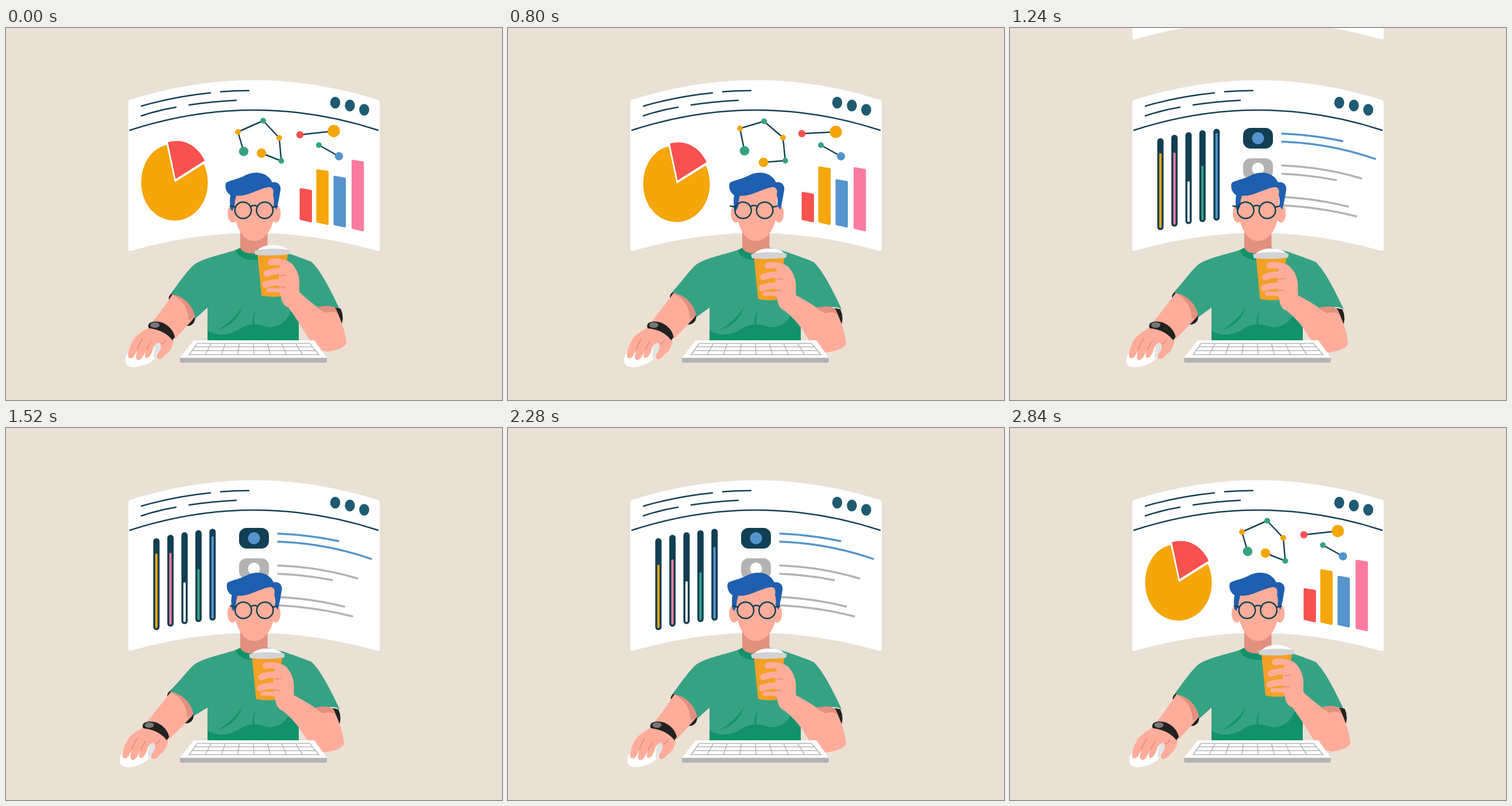
An HTML page for the animation above (2.88 s loop, 864 by 648 pixels).

```html
<!DOCTYPE html>
<html lang="en">
<head>
<meta charset="utf-8">
<title>Dashboard desk</title>
<style>
html, body { margin: 0; width: 100%; height: 100%; overflow: hidden; background: #eae0d4; }
svg { display: block; width: 100vw; height: 100vh; }
.line { fill: none; stroke: #134153; stroke-width: 2.5; stroke-linecap: round; stroke-linejoin: round; }
.skin { fill: #ffad9a; }
.shade { fill: #e2907f; }
.green { fill: #36a284; }
.deep { fill: #12926a; }
.black { fill: #222; }
.white { fill: #fff; }
.finger { fill: none; stroke: #ffad9a; stroke-width: 11; stroke-linecap: round; }
.crease { fill: none; stroke: #e2907f; stroke-width: 1.8; stroke-linecap: round; }
</style>
</head>
<body>
<svg viewBox="0 0 864 648">
  <defs>
    <g id="window">
      <path class="white" d="M213 130Q213 126 217 125Q432 57 647 125Q651 126 651 130V385Q651 389 646 388Q432 326 218 388Q213 389 213 385Z"/>
      <path class="line" d="M216 178Q432 108 648 178M236 136Q295 119 356 113M374 111Q398 109 423 109M236 153Q265 143 296 138M319 134Q360 128 401 126"/>
      <g fill="#1f5a73">
        <ellipse cx="573.5" cy="130" rx="8.7" ry="10.3"/>
        <ellipse cx="599" cy="135" rx="8.7" ry="10.3"/>
        <ellipse cx="624" cy="142.5" rx="8.7" ry="10.3"/>
      </g>
    </g>
  </defs>
  <rect width="864" height="648" fill="#eae0d4"/>

  <g id="settings">
    <use href="#window"/>
    <g id="sliders"></g>
    <rect x="406" y="174" width="52" height="36" rx="13" fill="#123f54"/>
    <circle cx="432" cy="192" r="10.5" fill="#5594cc"/>
    <rect x="406" y="227" width="52" height="36" rx="13" fill="#b3b3b3"/>
    <circle class="white" cx="432" cy="245" r="10.5"/>
    <g fill="none" stroke-width="3.4" stroke-linecap="round">
      <path stroke="#5594cc" d="M474 184Q528 186 579 197M474 198Q558 201 636 228"/>
      <path stroke="#b3b3b3" d="M474 239.500Q545 242 612 262M474 254Q522 256 568 265M474 294.500Q532 297 589 311M474 309Q540 312 603 328"/>
    </g>
  </g>

  <g id="charts">
    <use href="#window"/>
    <g id="pie">
      <path fill="#f4a60a" d="M294 268.500L280 204C253 209 235.500 238 235.500 269C235.500 307 261 335.500 293.500 335.500C326 335.500 351.500 306 351.500 270C351.500 258 349 246 344.500 237Z"/>
      <path id="slice" fill="#f75150" d="M295.500 263L282 199C308 191 333 204 346 231Z"/>
    </g>
    <path id="links" class="line"/>
    <g id="nodes"></g>
    <g id="bars"></g>
  </g>

  <g id="person">
    <path class="shade" d="M408 350H455.500V398H408Z"/>
    <g id="head">
      <g id="ears" class="skin">
        <ellipse cx="395" cy="323" rx="9" ry="16"/>
        <ellipse cx="470" cy="323" rx="8.500" ry="16"/>
      </g>
      <path class="skin" d="M396 285L398 326C403 352 414 371 432 371C450 371 463 352 467 330L470 274H430Z"/>
      <path id="hair" fill="#1f5fb0" d="M391 315Q389 301 391 291C383 287 380 274 384 269C395 264 408 262 418 256C436 248 456 252 464 269C472 267 480 273 478 283C476 294 475 303 471 317L466 308Q468 300 465 290Q468 279 459 277C441 279 418 295 401 292Q398 301 398 311L394 319Z"/>
      <g id="glasses" class="line">
        <circle cx="413" cy="317.500" r="14.300"/>
        <circle cx="450.700" cy="317.500" r="14.300"/>
        <path d="M426 311Q432 307 438 311M400 312L391 310M464 312L472 310.500"/>
      </g>
    </g>
    <g id="mouseArm">
      <path id="cuff" class="black"/>
      <path id="forearm" class="skin"/>
      <path id="armShade" class="shade"/>
      <g id="mouseHand">
        <path class="white" d="M208 583C205 563 230 547 254 546C276 546 275 566 256 579C242 590 213 597 208 583Z"/>
        <path fill="#e3e3e3" d="M262 547Q274 552 268 566L258 577Q256 560 262 547Z"/>
        <path class="skin" d="M250 521C236 529 224 537 220 546C214 558 210 573 215 575Q220 577 224 570L229 561Q224 575 229 578Q235 580 240 569L245 560Q239 572 244 575Q250 575 255 563Q258 550 266 548Q272 553 268 562Q260 572 264 576Q270 579 278 569Q290 561 292 545Q285 528 250 521Z"/>
        <path class="crease" d="M238 541Q232 550 229 560M253 546Q248 552 245 560M271 550Q276 549 278 543"/>
        <path class="black" d="M250 514Q258 509 272 513Q290 521 294 538L290 544Q276 526 249 523Q246 518 250 514Z"/>
        <ellipse cx="259.500" cy="517.500" rx="8" ry="4.800" fill="#777"/>
      </g>
    </g>
    <path id="shirt" class="green"/>
    <path class="deep" d="M400 387Q406 405 436 404Q460 402 464 388L455 383Q452 393 432 393Q412 393 408 383Z"/>
    <path class="deep" d="M351 527C373 540 395 533 410 522C425 514 437 515 448 519C470 526 491 513 497 490L510 500V544H351Z"/>
    <path class="deep" d="M411 486Q402 516 369 526Q395 511 411 486ZM438 487Q429 502 434 522L430 520Q427 502 438 487Z"/>
    <g id="cup">
      <path fill="#f3a026" d="M438 394L491 393L481 467Q462 470 445 466Z"/>
      <path class="white" d="M438 387Q447 378 464 378Q482 378 492 387L464 391Z"/>
      <path fill="#d3d3d3" d="M433 388Q464 381 495 387L494 394Q464 398 434 395Z"/>
    </g>
    <path id="cupCuff" class="black"/>
    <path id="cupArm" class="skin"/>
    <path id="cupShade" class="shade"/>
    <g id="cupHand">
      <path class="skin" d="M484 404C499 405 510 424 511 440V465L494 487Q480 485 478 463Q472 450 477 420Q477 409 484 404Z"/>
      <path class="finger" d="M462 408Q476 405 488 412M454 428Q468 422 486 424M452 447Q468 441 486 444" stroke-width="11"/>
      <path class="finger" d="M457 457Q470 455 484 460" style="stroke-width:7"/>
      <path class="crease" d="M478 432Q484 430 488 431M476 451Q482 450 486 452"/>
    </g>
  </g>

  <g id="keyboard">
    <path fill="#b3b3b3" d="M303 574H559V579Q559 583 555 583H307Q303 583 303 579Z"/>
    <path class="white" d="M327 544H537L559 574.500H303Z"/>
    <path id="keys" fill="none" stroke="#b5b5b5" stroke-width="1.600"/>
  </g>
</svg>
<script>
const LOOP = 2880, STEP = 40;
const POSE_TIMES = [0, 400, 800, 1240, 1840, 2280, 2840, LOOP];
const CHART_TIMES = [0, 400, 800, 1240, 2840, LOOP];
const SETTING_TIMES = [0, 1240, 1840, 2280, LOOP];

const $ = id => document.getElementById(id);
const draw = (id, d) => $(id).setAttribute('d', d);
const move = (id, x, y = 0) => $(id).setAttribute('transform', `translate(${x} ${y})`);

function add(parent, tag, attrs) {
  const node = document.createElementNS('http://www.w3.org/2000/svg', tag);
  for (const name in attrs) node.setAttribute(name, attrs[name]);
  return $(parent).appendChild(node);
}

// Monotone cubic curve through the keys, flat at turning points.
function track(times, values) {
  const slopes = values.slice(1).map((v, i) => (v - values[i]) / (times[i + 1] - times[i]));
  const tangents = values.map((_, i) => {
    const a = slopes[i - 1], b = slopes[i];
    return a * b > 0 ? 2 * a * b / (a + b) : 0;
  });
  return t => {
    let i = 0;
    while (i < times.length - 2 && t >= times[i + 1]) i++;
    const h = times[i + 1] - times[i], p = (t - times[i]) / h, q = 1 - p;
    return values[i] * (1 + 2 * p) * q * q + values[i + 1] * (3 - 2 * p) * p * p
      + h * p * q * (tangents[i] * q - tangents[i + 1] * p);
  };
}
const pose = (...v) => track(POSE_TIMES, [...v, v[0]]);
const chart = (a, b, c) => track(CHART_TIMES, [a, b, c, c, a, a]);

const hair = pose(0, 3, 3, 3, 1, 0, 0);
const ears = pose(0, 2, 2, 2, -3, -1, 0);
const glasses = pose(0, -3.5, -3.5, -2.5, 3.3, 0.8, 0);
const cupDown = pose(0, 0, 1, 1, 1, 1, 0);
const reach = track([0, 400, 800, 1240, 1640, 1840, 2280, 2840, LOOP], [0, 1, .5, .5, 1, .88, 0, 0, 0]);
const sliceOut = chart(0, 1, 0);
const pieDrop = chart(0, 0, 2.5);

// x and y in the three chart poses, radius, colour
const GOLD = '#f4a60a', TEAL = '#36a284', RED = '#f75150', SKY = '#5594cc', PINK = '#fb7ba0';
const nodes = [
  [[414, 414, 412], [215, 213, 214], 8.3, TEAL],
  [[404, 402, 404], [181, 178, 175], 5, GOLD],
  [[448, 447, 446], [161.5, 160.5, 162.5], 5, TEAL],
  [[476, 474, 479], [191.5, 192, 191], 5, GOLD],
  [[479.5, 479, 483], [231.5, 230, 231], 5, TEAL],
  [[445, 444.5, 445], [218, 223, 234], 8.3, GOLD],
  [[512, 513, 512], [186, 188, 184], 6.3, RED],
  [[571, 570, 571], [179.5, 177, 181], 10.7, GOLD],
  [[545, 544, 545], [204, 205, 204], 5, TEAL],
  [[580, 581, 580], [223.5, 222, 223.5], 7.2, SKY]
].map(([x, y, r, fill]) => ({ x: chart(...x), y: chart(...y), el: add('nodes', 'circle', { r, fill }) }));
const lineStarts = [0, 6, 8];

// left edge, bottom, top in the three poses
const bars = [
  [511.5, 333.5, [279, 285.5, 285.5], RED],
  [540.5, 338, [246, 244, 241], GOLD],
  [570.5, 342.5, [257.5, 260.5, 263.5], SKY],
  [602, 349, [229.5, 226, 242.5], PINK]
].map(([x, bottom, top, color]) => ({
  x, bottom, top: chart(...top),
  el: add('bars', 'path', { fill: color, stroke: color, 'stroke-width': 4, 'stroke-linejoin': 'round' })
}));

// centre, top of the groove, fill top at the three setting poses
const sliders = [
  [262, 192, [218, 220, 238], GOLD],
  [286.5, 186, [217, 219, 229], PINK],
  [311, 181.5, [267, 271, 267], '#fff'],
  [335.3, 178, [240, 252, 251], TEAL],
  [359.8, 175.5, [183, 199, 207], SKY]
].map(([x, y, [a, b, c], fill]) => {
  add('sliders', 'rect', { x: x - 5.5, y, width: 11, height: 160, rx: 5.5, fill: '#123f54' });
  return {
    bottom: y + 156.5, top: track(SETTING_TIMES, [a, a, b, c, c]),
    el: add('sliders', 'rect', { x: x - 2, width: 4, rx: 2, fill })
  };
});

let grid = 'M333 549.500H529L545 569H319ZM328.500 555.500H534M324 562H539.500';
for (let i = 1; i < 8; i++) grid += `M${333 + i * 24.5} 549.500L${319 + i * 28.25} 569`;
draw('keys', grid);

// The charts window lifts away, later it drops back over the settings.
function lift(t) {
  const ease = p => p < .5 ? 2 * p * p : 1 - 2 * (1 - p) ** 2;
  const part = start => ease(Math.min(1, Math.max(0, (t - start) / 380)));
  return 535 * (part(2400) - part(1010));
}

function drawCharts(t) {
  move('charts', 0, lift(t));
  move('pie', 0, pieDrop(t));
  move('slice', 5 * sliceOut(t), -13 * sliceOut(t));
  const points = nodes.map(n => [n.x(t), n.y(t)]);
  nodes.forEach(({ el }, i) => {
    el.setAttribute('cx', points[i][0]);
    el.setAttribute('cy', points[i][1]);
  });
  draw('links', points.map((p, i) => (lineStarts.includes(i) ? 'M' : 'L') + p).join(''));
  for (const { x, bottom, top, el } of bars) {
    const y = top(t) + 2;
    el.setAttribute('d', `M${x + 2} ${y}l17.500 3V${bottom + 3}l-17.500 -4Z`);
  }
}

function drawSettings(t) {
  for (const { bottom, top, el } of sliders) {
    el.setAttribute('y', top(t));
    el.setAttribute('height', bottom - top(t));
  }
}

function drawMouseArm(k) {
  const hand = (x, y) => `${x - 11 * k} ${y} `;
  const hem = (x, y) => `${x - 3 * k} ${y - 5 * k} `;
  move('mouseHand', -11 * k);
  draw('forearm', `M${hem(290, 464)}Q${hem(322, 470)}${hem(329, 503)}Q${hem(322, 512)}${hand(294, 542)}L${hand(252, 516)}Q${hand(270, 494)}${hem(290, 464)}Z`);
  draw('armShade', `M${hem(290, 464)}Q${hem(325, 466)}${hem(330, 500)}Q${hem(327, 507)}${hem(318, 509)}Q${hem(318, 480)}${hem(290, 464)}Z`);
  draw('cuff', `M${hem(289, 462)}Q${hem(282, 467)}${hem(284, 474)}L${hem(290, 473)}L${hem(296, 464)}ZM${hem(329, 499)}Q${hem(332, 516)}${hem(318, 519)}Q${hem(310, 519)}${hem(312, 515)}Z`);
  draw('shirt', `M402 386C380 394 345 400 328 412C317 421 300 445 ${hem(287, 463)}C${hem(311, 467)}${hem(327, 485)}${hem(330, 506)}L351 487V544H510V478L540 489Q575 482 582 491C567 460 550 425 533 408C515 400 495 394 485 390L455 383Q452 393 432 393Q412 393 408 383Z`);
}

function drawCupArm(k) {
  const hand = (x, y) => `${x - 9.5 * k} ${y + 6 * k} `;
  const elbow = (x, y) => `${x - 4 * k} ${y + k} `;
  move('cup', -9.5 * k, 6 * k);
  move('cupHand', -9.5 * k, 6 * k);
  draw('cupCuff', `M${elbow(573, 487)}L${elbow(583, 489)}Q${elbow(589, 502)}${elbow(585, 515)}L${elbow(574, 498)}Z`);
  draw('cupArm', `M${hand(510, 459)}Q${elbow(528, 476)}${elbow(545, 488)}Q${elbow(566, 482)}${elbow(575, 490)}C${elbow(584, 510)}${elbow(592, 532)}${elbow(593, 549)}Q${elbow(588, 560)}${elbow(560, 564)}Q${elbow(540, 561)}${elbow(524, 536)}Q${elbow(509, 510)}${hand(492, 487)}Z`);
  draw('cupShade', `M${elbow(541, 487)}Q${elbow(565, 480)}${elbow(575, 490)}L${elbow(577, 497)}Q${elbow(569, 492)}${elbow(556, 496)}Z`);
}

function render(t) {
  drawCharts(t);
  drawSettings(t);
  move('hair', hair(t));
  move('ears', ears(t));
  move('glasses', glasses(t));
  drawMouseArm(reach(t));
  drawCupArm(cupDown(t));
}

const start = performance.now();
function frame() {
  const t = (performance.now() - start) % LOOP;
  render(Math.floor(t / STEP) * STEP);
  requestAnimationFrame(frame);
}
frame();
</script>
</body>
</html>
```
